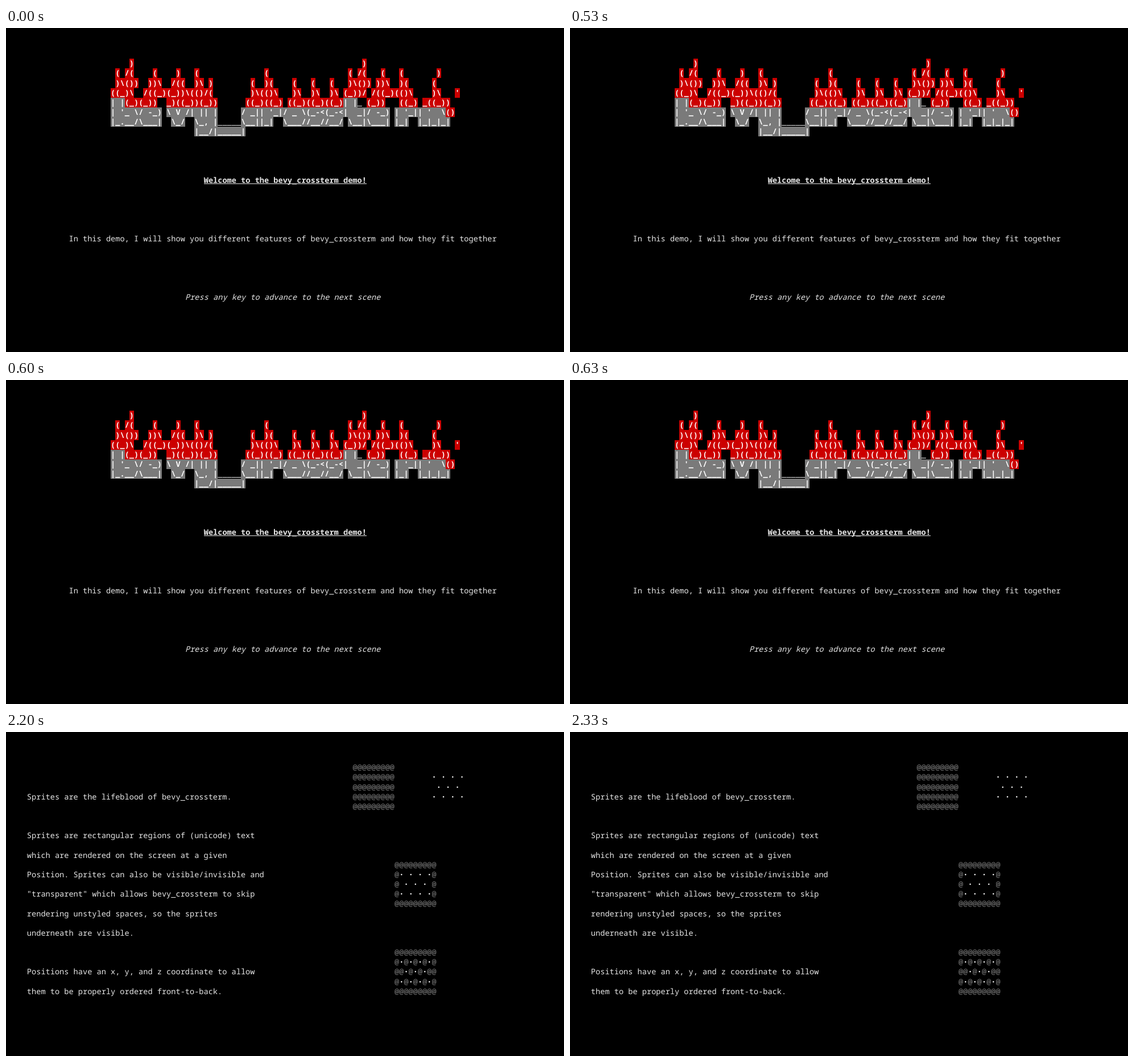
An HTML page for the animation above (8 s loop, 981x571 px).

```html
<!DOCTYPE html>
<html lang="en">
<head>
<meta charset="utf-8">
<title>Terminal demo</title>
<style>
  html, body { margin: 0; width: 100%; height: 100%; overflow: hidden; background: #000; }
  svg { display: block; width: 981px; height: 571px; }
  text {
    font-family: "Noto Sans Mono", "DejaVu Sans Mono", monospace;
    font-size: 13.633px;
    fill: #e6e6e6;
    white-space: pre;
    text-rendering: geometricPrecision;
  }
  rect { shape-rendering: crispEdges; }
  .bold { font-weight: 700; }
  .bright { font-weight: 700; fill: #fff; }
  .italic { font-style: italic; }
  .dim { fill: #7c7c7c; }
</style>
</head>
<body>
<svg viewBox="0 0 981 571">
  <rect width="981" height="571" fill="#000"/>
  <g id="welcome"></g>
  <g id="sprites"></g>
</svg>
<script>
const LOOP = 8000, SCENE_CHANGE = 2200;
const CELL_W = 8.18, CELL_H = 17.15, LEFT = 4.15, TOP = 2.6, BASELINE = 13.2;
const RED = "#cc0000", GREY = "#7a7a7a";

const welcome = document.getElementById("welcome");
const sprites = document.getElementById("sprites");
const colX = col => LEFT + col * CELL_W;
const rowY = row => TOP + row * CELL_H;

function add(parent, tag, attrs, content = "") {
  const node = document.createElementNS("http://www.w3.org/2000/svg", tag);
  for (const name in attrs) node.setAttribute(name, attrs[name]);
  node.textContent = content;
  parent.append(node);
}

function print(scene, col, row, content, style = "") {
  add(scene, "text", { x: colX(col), y: rowY(row) + BASELINE, class: style }, content);
}

function fillCells(scene, col, row, count, fill) {
  add(scene, "rect", { x: colX(col), y: rowY(row), width: count * CELL_W, height: CELL_H, fill });
}

// Every unbroken run is printed at its own column; "~" is a filled blank.
function printArt(scene, col, row, art, style, fill) {
  art.split("\n").slice(1, -1).forEach((line, i) => {
    for (const run of line.matchAll(/\S+/g)) {
      const x = col + run.index;
      fillCells(scene, x, row + i, run[0].length, fill);
      print(scene, x, row + i, run[0].replaceAll("~", " "), style);
    }
  });
}

const flames = String.raw`
    )                                                 )
 ( /(    (    )   (              (                 ( /(   (   (       )
 )\())  ))\  /((  )\ )        (  )(    (   (   (   )\()) ))\  )(     (
((_)\  /((_)(_))\(()/(        )\(()\   )\  )\  )\ (_))/ /((_)(()\    )\   '
   (_)(_))  _)((_))(_))      ((_)((_) ((_)((_)((_)     (_))   ((_) _((_))
                                                                        ()
`;
const letters = String.raw`
|~|                                               |~|
|~'_~\/~-_) \~V~/|~||~|     /~_||~'_|/~_~\(_-<(_-<|~~_|/~-_) |~'_||~'~~\
|_.__/\___|  \_/  \_,~|     \__||_|  \___//__//__/ \__|\___| |_|  |_|_|_|
                  |__/|_____|
`;
printArt(welcome, 22, 3, flames, "bright", RED);
printArt(welcome, 22, 7, letters, "bright", GREY);
print(welcome, 75, 7, "_");
print(welcome, 45, 9, "_____");

const heading = "Welcome to the bevy_crossterm demo!";
print(welcome, 42, 15, heading, "bold");
add(welcome, "rect", { x: colX(42), y: 274, width: heading.length * CELL_W, height: 1, fill: "#e6e6e6" });
print(welcome, 13, 21, "In this demo, I will show you different features of bevy_crossterm and how they fit together");
print(welcome, 38, 27, "Press any key to advance to the next scene", "italic");

const lines = [
  [6, "Sprites are the lifeblood of bevy_crossterm."],
  [10, "Sprites are rectangular regions of (unicode) text"],
  [12, "which are rendered on the screen at a given"],
  [14, "Position. Sprites can also be visible/invisible and"],
  [16, "\"transparent\" which allows bevy_crossterm to skip"],
  [18, "rendering unstyled spaces, so the sprites"],
  [20, "underneath are visible."],
  [24, "Positions have an x, y, and z coordinate to allow"],
  [26, "them to be properly ordered front-to-back."],
];
for (const [row, content] of lines) print(sprites, 4, row, content);

function printBlock(col, row) {
  for (let i = 0; i < 5; i++) print(sprites, col, row + i, "@".repeat(9), "dim");
}

function printDots(col, row, transparent) {
  ["· · · ·", " · · · ", "· · · ·"].forEach((dots, i) => {
    [...dots].forEach((char, j) => {
      if (transparent && char === " ") return;
      fillCells(sprites, col + j, row + i, 1, "#000");
      print(sprites, col + j, row + i, char, "bright");
    });
  });
}

printBlock(74, 3);
printDots(91, 4, false);
printBlock(83, 13);
printDots(84, 14, false);
printBlock(83, 22);
printDots(84, 23, true);

const start = performance.now();
function draw() {
  const first = (performance.now() - start) % LOOP < SCENE_CHANGE;
  welcome.style.display = first ? "" : "none";
  sprites.style.display = first ? "none" : "";
  requestAnimationFrame(draw);
}
draw();
</script>
</body>
</html>
```
